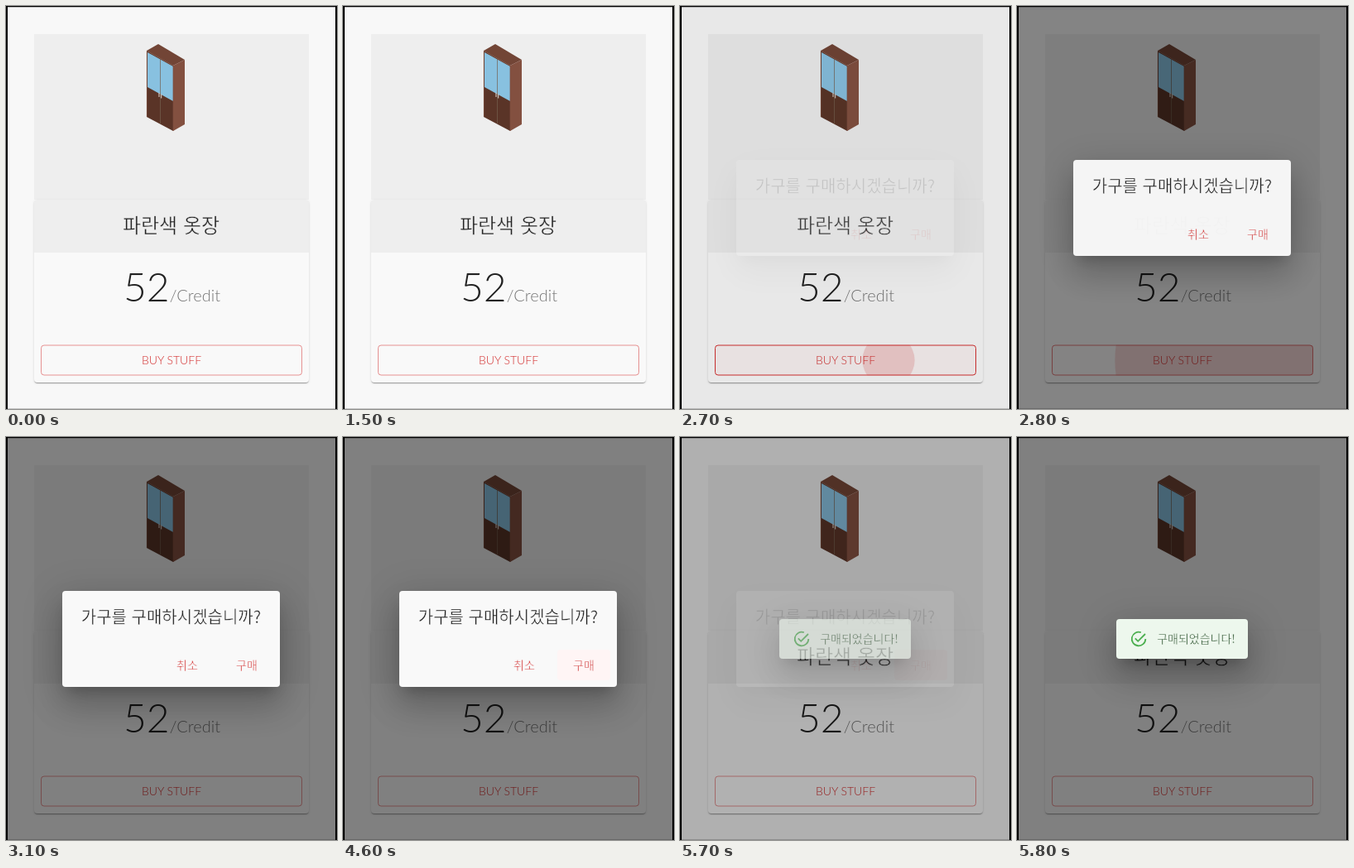
An HTML page for the animation above (8200 ms loop, 400 by 487 pixels).

```html
<!DOCTYPE html>
<html lang="ko">
<head>
<meta charset="utf-8">
<title>Buy dialog</title>
<style>
  html, body { margin: 0; width: 100%; height: 100%; overflow: hidden; background: #f8f8f8; }
  .layer, svg { position: absolute; left: 0; top: 0; width: 400px; height: 487px; }
  .layer { overflow: hidden; }
  .box { position: absolute; border-radius: 4px; }
  /* a thin stroke in the surface colour slims the Korean strokes */
  text { font-family: "Noto Sans CJK KR", "Noto Sans CJK", "Noto Sans CJK JP", sans-serif; font-weight: 300;
    text-anchor: middle; fill: #212121; stroke: var(--surface); stroke-width: .45px; }
  .latin { font-family: Lato, sans-serif; stroke: none; }
  .red { fill: #d32f2f; font-size: 14px; }
  #page { --surface: #eee; }
  #ask { --surface: #f9f9f9; }
  #done { --surface: #edf7ed; }
  #photo { position: absolute; left: 34px; top: 34px; width: 332px; height: 200px; background: #eee; }
  #card { left: 34px; top: 234px; width: 332px; height: 221px; background: #f9f9f9;
    box-shadow: 0 2px 1px -1px rgba(0,0,0,.2), 0 1px 1px rgba(0,0,0,.14), 0 1px 3px rgba(0,0,0,.12); }
  #head { height: 64px; background: #eee; border-radius: 4px 4px 0 0; }
  .float { background: var(--surface);
    box-shadow: 0 11px 15px -7px rgba(0,0,0,.2), 0 24px 38px 3px rgba(0,0,0,.14), 0 9px 46px 8px rgba(0,0,0,.12); }
  #ask .box { left: 68px; top: 186px; width: 263px; height: 116px; }
  #done .box { left: 120px; top: 220px; width: 159px; height: 48px; }
  #dim { background: #000; }
</style>
</head>
<body>
<div class="layer" id="page">
  <div id="photo"></div>
  <div id="card" class="box"><div id="head"></div></div>
  <svg viewBox="0 0 400 487">
    <clipPath id="buyClip"><rect x="42" y="409.5" width="316" height="37" rx="4"/></clipPath>
    <g fill="none" stroke-width=".7">
      <path d="M170 54L184 46L216 65L202 72Z" fill="#724536"/>
      <path d="M202 72L216 65V143L202 151Z" fill="#835040"/>
      <path d="M170 54L202 72V151L170 134Z" fill="#5a3427"/>
      <path d="M171 56L202 73V115L171 98Z" fill="#88c1e0"/>
      <path d="M186.5 64V142" stroke="#75604f"/>
      <path d="M170.4 134V54.3L202 72.3V151" stroke="#80503f"/>
      <path d="M185 105V110M187.7 106.5V111.5" stroke="#e5d9d2" stroke-width="1"/>
    </g>
    <text x="199.5" y="274" font-size="24">파란색 옷장</text>
    <text class="latin" x="200.5" y="357" font-size="48">52<tspan font-size="20" fill="#757575">/Credit</tspan></text>
    <rect id="buy" x="42.5" y="410" width="315" height="36" rx="3.5" fill="#d32f2f" stroke="#d32f2f"/>
    <circle id="buyRipple" cx="252" cy="428" fill="#d32f2f" clip-path="url(#buyClip)"/>
    <text class="latin red" x="200" y="432.5">BUY STUFF</text>
  </svg>
</div>
<div class="layer" id="dim"></div>
<div class="layer" id="ask">
  <div class="box float"></div>
  <svg viewBox="0 0 400 487">
    <clipPath id="okClip"><rect x="259" y="257" width="64" height="37" rx="4"/></clipPath>
    <rect id="ok" x="259" y="257" width="64" height="37" rx="4" fill="#fff5f5"/>
    <circle id="okRipple" cx="295" cy="275" fill="#d32f2f" clip-path="url(#okClip)"/>
    <text x="199.5" y="225" font-size="20">가구를 구매하시겠습니까?</text>
    <text class="red" x="219" y="280.5">취소</text>
    <text class="red" x="291" y="280.5">구매</text>
  </svg>
</div>
<div class="layer" id="done">
  <div class="box float"></div>
  <svg viewBox="0 0 400 487">
    <g fill="none" stroke="#4caf50" stroke-width="1.8">
      <path d="M149.8 236.2A8.3 8.3 0 1 0 155.3 244"/>
      <path d="M142.8 243.4L146.2 246.8L155 238"/>
    </g>
    <text x="216.5" y="248.5" font-size="14" style="fill:#1e4620">구매되었습니다!</text>
  </svg>
</div>
<svg viewBox="0 0 400 487">
  <path d="M1 487V0M399 487V0" stroke="#000" stroke-width="2"/>
  <path d="M0 .6H400" stroke="#000" stroke-width="1.2"/>
  <path d="M0 486.5H400" stroke="#000" stroke-opacity=".2"/>
</svg>
<script>
  const LOOP = 8200, STEP = 100, FADE = 150;
  const HOVER = 1480, PRESS = 2669, OK_HOVER = 4600, OK_PRESS = 5580, DONE = 5615;
  const $ = id => document.getElementById(id);

  // eased 0 to 1, beginning at start
  function fade(t, start, length = FADE) {
    const x = Math.min(1, Math.max(0, (t - start) / length));
    return x * x * (3 - 2 * x);
  }

  function ripple(id, t, start) {
    $(id).setAttribute('r', Math.max(0, 1.02 * (t - start)));
    $(id).setAttribute('fill-opacity', .18 * (1 - fade(t, start + 110)));
  }

  function draw(ms) {
    const t = Math.floor(ms % LOOP / STEP) * STEP;
    const hover = fade(t, HOVER, 200) - fade(t, PRESS + 30);
    const ask = fade(t, PRESS - 4) - fade(t, OK_PRESS);
    const done = fade(t, DONE);

    $('buy').setAttribute('fill-opacity', .04 * hover);
    $('buy').setAttribute('stroke-opacity', .5 + .5 * hover);
    $('ask').style.opacity = ask;
    $('done').style.opacity = done;
    $('dim').style.opacity = .485 * Math.max(ask, done);
    $('ok').style.opacity = t >= OK_HOVER ? 1 : 0;
    ripple('buyRipple', t, PRESS);
    ripple('okRipple', t, OK_PRESS);
  }

  const begin = performance.now();
  function tick() {
    draw(performance.now() - begin);
    requestAnimationFrame(tick);
  }
  tick();
</script>
</body>
</html>
```
